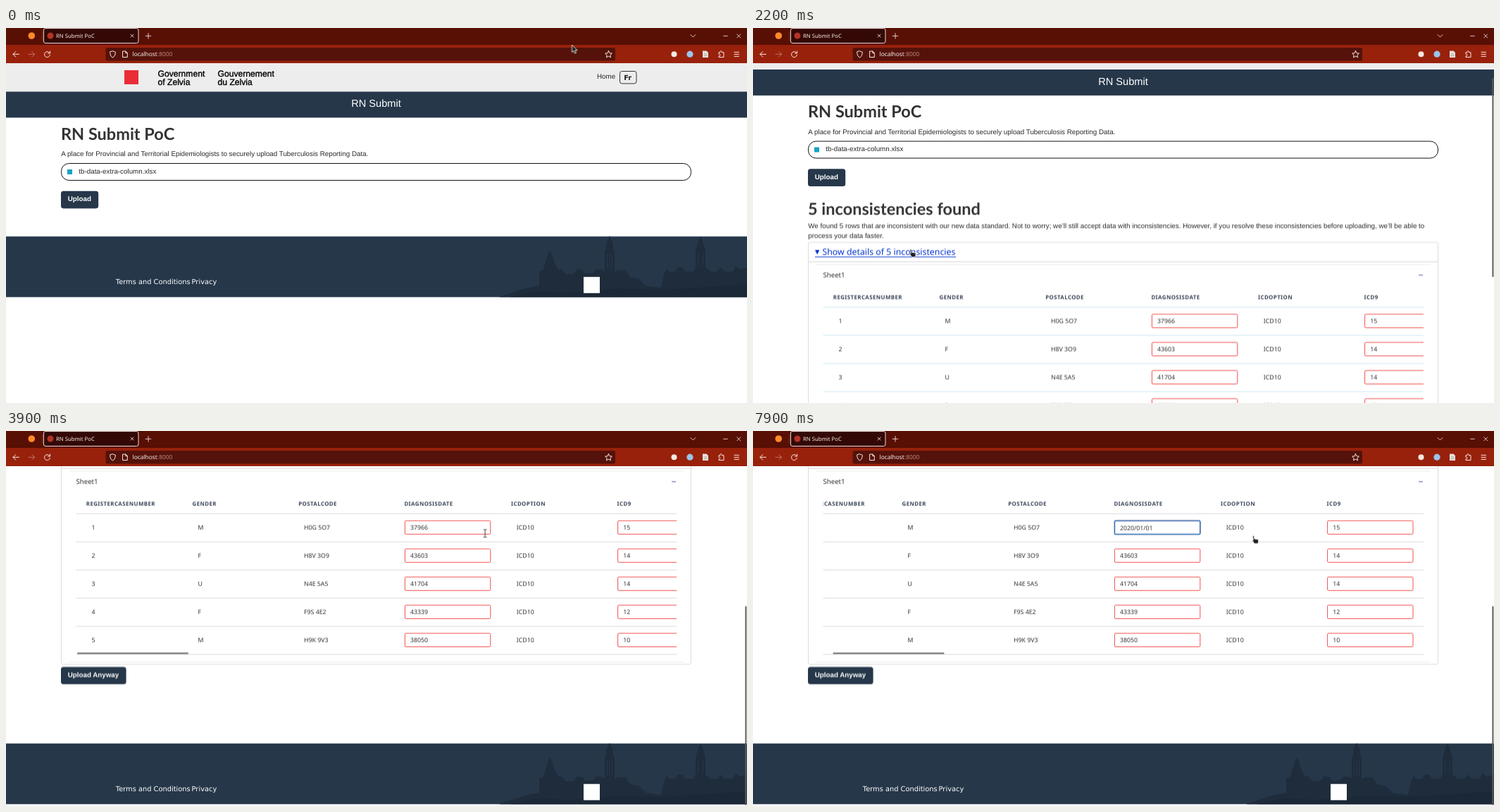
Animation of 1052x533 px, one loop 8 s. Source, as an HTML page:

```html
<!DOCTYPE html>
<html lang="en">
<head>
<meta charset="utf-8">
<title>RN Submit PoC</title>
<style>
@property --scroll { syntax: '<length>'; inherits: true; initial-value: 0px; }
@property --side { syntax: '<length>'; inherits: true; initial-value: 0px; }

html, body { margin: 0; width: 100%; height: 100%; overflow: hidden; background: #fff; }
svg { display: block; width: 100vw; height: 100vh; text-rendering: geometricPrecision; }
text { white-space: pre; }

.body { font: 9.8px 'Liberation Sans', Arial, sans-serif; fill: #2b2b2b; }
.title { font: 14.6px 'Liberation Sans', Arial, sans-serif; fill: #fff; }
.btn { font: bold 9.8px 'Liberation Sans', Arial, sans-serif; fill: #fff; }
.brand { font: 12.15px 'Liberation Sans', Arial, sans-serif; fill: #000; stroke: #000; stroke-width: .35; }
.head { font: bold 23.5px Lato, sans-serif; fill: #333; }
.ui { font-family: 'Noto Sans', sans-serif; fill: #333; }
.cell { font: 8.77px 'Noto Sans', sans-serif; fill: #333; }
.th { font: bold 7.9px 'Noto Sans', sans-serif; letter-spacing: .05em; fill: #3a4658; }
.foot { font: 9.86px 'DejaVu Sans', sans-serif; fill: #fff; }
.navy { fill: #26374a; }
.icon { fill: none; stroke: #f7e8e3; stroke-width: 1; stroke-linecap: round; stroke-linejoin: round; }
.box { fill: #fff; stroke: #dcdcdc; }
.input { fill: #fff; stroke: #f25050; }
.bar { fill: #5c5c5c; }

/* every part shares one 8 s clock */
svg, .t { animation: 8s step-end infinite; }
svg { animation-name: scroll, side; }
.page { transform: translateY(calc(var(--scroll) * -1)); }
.cols { transform: translateX(calc(var(--side) * -1)); }
.thumb-a { transform: translateY(calc(var(--scroll) * .97)); }
.thumb-b { transform: translateY(calc(var(--scroll) * .637)); }
.thumb-h { transform: translateX(calc(var(--side) * .236)); }

@keyframes scroll {
  0% { --scroll: 0px; }
  11.25% { --scroll: .6px; }
  18.75% { --scroll: .6px; animation-timing-function: steps(3, start); }
  22.5% { --scroll: 31.5px; }
  32.5% { --scroll: 31.5px; animation-timing-function: steps(2, start); }
  35% { --scroll: 83.9px; animation-timing-function: steps(3, start); }
  38.75%, 100% { --scroll: 310.8px; }
}
@keyframes side {
  0% { --side: 0px; }
  93.75% { --side: 0px; animation-timing-function: steps(5, start); }
  100% { --side: 53px; }
}

.results, .opened, .hand, .ibeam, .line, .focus, .sel, .typed, .caret { opacity: 0; }
.results { animation-name: results; }
@keyframes results { 11.25%, 100% { opacity: 1; } }
.opened { animation-name: opened; }
@keyframes opened { 23.75%, 100% { opacity: 1; } }
.closed { animation-name: closed; }
@keyframes closed { 23.75%, 100% { opacity: 0; } }
.anyway { animation-name: anyway; }
@keyframes anyway { 23.75%, 100% { transform: translateY(279.6px); } }
.footer { transform: translateY(296.3px); animation-name: footer; }
@keyframes footer {
  11.25% { transform: translateY(475.6px); }
  23.75%, 100% { transform: translateY(755px); }
}
.upload { animation-name: upload; }
@keyframes upload { 8.75% { fill: #3b4b5e; } 12.5% { fill: #26374a; } }
.sum { fill: #284162; animation-name: sum; }
@keyframes sum { 21.25% { fill: #0535d2; } 37.5% { fill: #284162; } }
.line { animation-name: line; }
@keyframes line { 21.25% { opacity: 1; } 37.5% { opacity: 0; } }
.rules { stroke: #c5e6f3; stroke-width: .85; animation-name: rules; }
@keyframes rules { 37.5%, 100% { stroke: #d2d5d9; } }
.bars { animation-name: bars; }
@keyframes bars {
  63.75% { opacity: 1; animation-timing-function: steps(4, start); }
  68.75% { opacity: 0; }
  92.5%, 100% { opacity: 1; }
}

.focus { animation-name: focus; }
@keyframes focus { 52.5%, 100% { opacity: 1; } }
.sel { animation-name: sel; }
@keyframes sel { 53.75% { opacity: 1; } 62.5% { opacity: 0; } }
.typed { animation-name: typed; }
@keyframes typed { 62.5%, 100% { opacity: 1; } }
.caret { animation-name: caret; }
@keyframes caret { 62.5% { opacity: 1; } 92.5% { opacity: 0; } }
.cover { animation-name: cover; }
@keyframes cover {
  62.5% { transform: translateX(5px); }
  63.75% { transform: translateX(10px); }
  66.25% { transform: translateX(15.05px); }
  67.5% { transform: translateX(20.06px); }
  70% { transform: translateX(23.3px); }
  72.5% { transform: translateX(28.3px); }
  73.75% { transform: translateX(33.4px); }
  77.5% { transform: translateX(36.6px); }
  80% { transform: translateX(41.6px); }
  81.25%, 100% { transform: translateX(46.8px); }
}

.cursor { animation-name: cursor; }
@keyframes cursor {
  0% { transform: translate(803.5px, 24px); }
  1.25% { transform: translate(803.5px, 24px); animation-timing-function: steps(7, start); }
  10% { transform: translate(106px, 242px); }
  12.5% { transform: translate(106px, 242px); animation-timing-function: steps(5, start); }
  18.75% { transform: translate(205px, 246px); animation-timing-function: steps(3, start); }
  22.5% { transform: translate(224.5px, 315px); }
  37.5% { transform: translate(224.5px, 315px); animation-timing-function: steps(2, start); }
  40% { transform: translate(358.5px, 275px); animation-timing-function: steps(3, start); }
  43.75% { transform: translate(553px, 203px); animation-timing-function: steps(4, start); }
  48.75% { transform: translate(701px, 150px); animation-timing-function: steps(3, start); }
  52.5% { transform: translate(638.5px, 136.5px); }
  92.5% { transform: translate(638.5px, 136.5px); animation-timing-function: steps(2, start); }
  95%, 100% { transform: translate(711px, 149.5px); }
}
.arrow { animation-name: arrow; }
@keyframes arrow { 8.75% { opacity: 0; } 12.5% { opacity: 1; } 21.25%, 100% { opacity: 0; } }
.hand { animation-name: hand; }
@keyframes hand {
  8.75% { opacity: 1; } 12.5% { opacity: 0; }
  21.25% { opacity: 1; } 37.5% { opacity: 0; } 93.75%, 100% { opacity: 1; }
}
.ibeam { animation-name: ibeam; }
@keyframes ibeam { 37.5% { opacity: 1; } 93.75% { opacity: 0; } }
</style>
</head>
<body>
<svg viewBox="0 0 1052 533" preserveAspectRatio="none">
  <defs>
    <clipPath id="view"><rect x="99.5" y="60" width="852.5" height="262"/></clipPath>
  </defs>

  <g class="page">
    <rect y="50" width="1052" height="41" fill="#ededed"/>
    <rect x="168" y="60" width="20" height="20" fill="#eb2d37"/>
    <g class="brand">
      <text x="215.5" y="69">Government</text><text x="215.5" y="80.5">of Zelvia</text>
      <text x="300.5" y="69">Gouvernement</text><text x="300.5" y="80.5">du Zelvia</text>
    </g>
    <text class="body" x="839" y="72.4">Home</text>
    <rect x="871.5" y="61.5" width="23.5" height="17.5" rx="3" fill="none" stroke="#333"/>
    <text x="877.3" y="73.6" font-family="'DejaVu Sans', sans-serif" font-weight="bold" font-size="9.8" fill="#222">Fr</text>
    <rect class="navy" y="90.5" width="1052" height="36.9"/>
    <text class="title" x="525.5" y="112" text-anchor="middle">RN Submit</text>

    <text class="head" x="78" y="158.6">RN Submit PoC</text>
    <text class="body" x="78.3" y="182">A place for Provincial and Territorial Epidemiologists to securely upload Tuberculosis Reporting Data.</text>
    <rect x="78.5" y="192.5" width="894" height="24" rx="11" fill="#fff" stroke="#111"/>
    <rect x="87" y="201" width="7" height="7" fill="#16a3c4"/>
    <text class="body" x="103.3" y="206.6">tb-data-extra-column.xlsx</text>
    <rect class="t upload navy" x="78" y="231.7" width="53.2" height="24.7" rx="3.5"/>
    <text class="btn" x="87.7" y="246.1">Upload</text>

    <g class="t results">
      <text class="head" x="78" y="297.3">5 inconsistencies found</text>
      <text class="body" x="78.3" y="315.6">We found 5 rows that are inconsistent with our new data standard. Not to worry; we’ll still accept data with inconsistencies. However, if you resolve these inconsistencies before uploading, we’ll be able to</text>
      <text class="body" x="78.3" y="330.4">process your data faster.</text>
      <rect class="t closed box" x="78.5" y="336.1" width="894" height="27" rx="2"/>
      <g class="t opened">
        <rect class="box" x="78.5" y="336.1" width="894" height="306.2" rx="2"/>
        <path d="M78.5 363.8H972.5" stroke="#d4d4d4"/>
        <path d="M90 367.8H962M90 639H962" stroke="#ececec"/>
        <g transform="translate(0 310.8)">
          <text class="ui" x="99.4" y="75.6" font-size="9.7">Sheet1</text>
          <path d="M945.2 72H951" stroke="#4a4fb0"/>
          <g clip-path="url(#view)">
            <g class="cols">
              <g id="table"></g>
              <g class="t sel">
                <rect x="574" y="131.5" width="25.3" height="12" fill="#3584e4"/>
                <text class="cell" x="574" y="140.7" style="fill:#fff">37966</text>
              </g>
              <g class="t typed">
                <rect x="570" y="129" width="100" height="17" fill="#fff"/>
                <text class="cell" x="574" y="140.7">2020/01/01</text>
                <g class="t cover">
                  <rect x="574" y="129.5" width="60" height="16" fill="#fff"/>
                  <path class="t caret" d="M574.8 131.5V143" stroke="#111" stroke-width=".9"/>
                </g>
              </g>
              <rect class="t focus" x="566.4" y="127.5" width="121.4" height="19.2" rx="1.5" fill="none" stroke="#2670b8" stroke-width="1.5"/>
            </g>
            <path id="rules" class="t rules" fill="none"/>
          </g>
          <g class="t bars"><rect class="bar thumb-h" x="101" y="315" width="158" height="1.8" rx=".9"/></g>
        </g>
      </g>
      <g class="t sum">
        <path class="t closed" d="M89 347L94.5 350.2L89 353.5Z"/>
        <path class="t opened" d="M88 347H94.4L91.2 353.6Z"/>
        <text x="98.4" y="354.4" font-family="'Noto Sans', sans-serif" font-size="12.35">Show details of 5 inconsistencies</text>
        <rect class="t line" x="88" y="356.4" width="200" height="1"/>
      </g>
      <g class="t anyway">
        <rect class="navy" x="78" y="366.4" width="92.6" height="24.7" rx="3.5"/>
        <text class="btn" x="87.7" y="380.9">Upload Anyway</text>
      </g>
    </g>

    <g class="t footer">
      <rect class="navy" width="1052" height="86.2"/>
      <path fill="#1e2c3c" d="M700 86.2L718 80L740 73L757 70V50L762 48L765 40L770 24L772 20L774 24L780 40L784 47L789 47L795 54L806 53L810 47L818 47L822 53L834 52L838 47L846 47L850 50V20L852 18V10L856 1L857 -1L858 1L862 10V18L864 20V50L870 48L880 48L886 58L898 60L908 70L930 73L934 54L938 46L942 50H950L954 44L960 44L964 50H976L979 44V20L984 4L986 0L988 4L993 20V44L1000 50H1010L1014 44L1020 50H1032L1036 42L1042 47L1052 44V86.2Z"/>
      <path fill="#1a2635" d="M715 86.2L750 78L800 80L870 74L930 76L1052 68V86.2Z" opacity=".6"/>
      <path stroke="#2b3c50" d="M853.5 24V46M857 24V46M860.5 24V46M982.5 24V42M989.5 24V42" fill="none" opacity=".7"/>
      <text class="foot" x="155.8" y="67.4">Terms and Conditions</text>
      <text class="foot" x="263.6" y="67.4">Privacy</text>
      <rect x="820" y="57.5" width="23" height="23" fill="#fff"/>
    </g>
  </g>

  <g class="t results">
    <g class="t bars">
      <g class="t closed"><rect class="bar thumb-a" x="1049.4" y="51.5" width="2" height="449.5" rx="1"/></g>
      <g class="t opened"><rect class="bar thumb-b" x="1049.4" y="51" width="2" height="283" rx="1"/></g>
    </g>
  </g>

  <rect width="1052" height="24.5" fill="#580f04"/>
  <rect y="24" width="1052" height="26" fill="#98210b"/>
  <circle cx="36.3" cy="11" r="4.8" fill="#ff8a2a"/>
  <path d="M51.5 5V18" stroke="#7d3a2f" stroke-width=".8"/>
  <rect x="53.5" y=".5" width="134.5" height="21" rx="2.5" fill="#340905" stroke="#e9d8d3"/>
  <circle cx="63" cy="11" r="4.5" fill="#b23327"/>
  <text class="ui" x="71" y="13.9" font-size="7.75" style="fill:#f8ebe7">RN Submit PoC</text>
  <rect x="141.5" y="28" width="723.5" height="18.5" rx="2.5" fill="#54120a"/>
  <text class="ui" x="179.5" y="40.2" font-size="8.4" style="fill:#fbf1ee">localhost<tspan fill="#b9857a">:8000</tspan></text>
  <g class="icon">
    <path d="M177.2 9L181.2 13M181.2 9L177.2 13M202 7.5V15.1M198.2 11.3H205.8M972 9.5L975.5 13L979 9.5M1018.7 11.3H1024.3M1037.8 8.8L1042.8 13.8M1042.8 8.8L1037.8 13.8" stroke-width=".85"/>
    <path d="M18.5 37.3H10M13.8 33.5L10 37.3L13.8 41.1"/>
    <path d="M32 37.3H40.5M36.7 33.5L40.5 37.3L36.7 41.1" opacity=".4"/>
    <path d="M62 35.5A4 4 0 1 0 62.5 38.3M62.6 33V36H59.6"/>
    <path d="M151.5 32.8L155.3 34.2C155.3 38.5 154 40.5 151.5 42C149 40.5 147.7 38.5 147.7 34.2Z"/>
    <path d="M166 33H169.8L172.3 35.5V41.5H166ZM169.8 33V35.5H172.3"/>
    <path d="M855.5 32.5L857 35.7L860.4 36.1L857.9 38.4L858.5 41.8L855.5 40.1L852.5 41.8L853.1 38.4L850.6 36.1L854 35.7Z"/>
    <path d="M1012 36V34.7H1014C1013.3 31.8 1017 31.8 1016.3 34.7H1019V41.5H1012V39.7C1014.8 40.3 1014.8 36.5 1012 37Z"/>
    <path d="M1034 34.3H1040.5M1034 37.3H1040.5M1034 40.3H1040.5"/>
  </g>
  <circle cx="948.5" cy="37.2" r="4" fill="#f7e8e3"/>
  <circle cx="971" cy="37.2" r="4.6" fill="#9cc4ea"/>
  <path d="M989 32.5H994.5L997 35V42H989Z" fill="#e6e1df"/>
  <path d="M990.5 37H995.5M990.5 39.5H995.5" stroke="#9a9290" stroke-width=".8"/>

  <g class="t cursor">
    <path class="t arrow" d="M0 0V10.5L2.5 8.3L4.1 12.2L6 11.4L4.4 7.7H7.6Z" fill="#222" stroke="#fff" stroke-width=".8"/>
    <path class="t hand" d="M-1.5 .5C-1.5 -.7 .4 -.7 .5 .5L.8 3.8L5 4.6C6.4 4.9 6.8 5.7 6.6 7L6 10.5H.8L-1.8 6.5C-2.3 5.5 -1.3 4.8 -.6 5.6Z" fill="#222" stroke="#fff" stroke-width=".7"/>
    <path class="t ibeam" d="M-2.3 -5.5H-.7L0 -5L.7 -5.5H2.3M0 -5V5M-2.3 5.5H-.7L0 5L.7 5.5H2.3" fill="none" stroke="#3a3a3a"/>
  </g>
</svg>

<script>
const cols = [113.8, 264.6, 415.2, 565.4, 717, 867.6];
const heads = ['RegisterCaseNumber', 'Gender', 'PostalCode', 'DiagnosisDate', 'ICDOption', 'ICD9'];
const rows = [
  ['1', 'M', 'H0G 5O7', '37966', 'ICD10', '15'],
  ['2', 'F', 'H8V 3O9', '43603', 'ICD10', '14'],
  ['3', 'U', 'N4E 5A5', '41704', 'ICD10', '14'],
  ['4', 'F', 'F9S 4E2', '43339', 'ICD10', '12'],
  ['5', 'M', 'H9K 9V3', '38050', 'ICD10', '10']
];
const rowTop = i => 117.5 + 40 * i;
const label = (cls, x, y, s) => `<text class="${cls}" x="${x}" y="${y}">${s}</text>`;
const field = (x, y) => `<rect class="input" x="${x}" y="${y}" width="121.4" height="19.2" rx="1.5"/>`;

const cell = (s, c, top) => {
  const editable = c === 3 || c === 5;
  const x = cols[c] + (editable ? 8.6 : 7.8);
  return (editable ? field(cols[c] + 1, top + 10) : '') + label('cell', x, top + 23.2, s);
};

document.getElementById('table').innerHTML =
  heads.map((h, c) => label('th', cols[c], 106.1, h.toUpperCase())).join('') +
  rows.map((r, i) => r.map((s, c) => cell(s, c, rowTop(i))).join('')).join('');

document.getElementById('rules').setAttribute('d',
  Array.from({ length: 6 }, (_, i) => `M99.5 ${rowTop(i)}H952`).join(''));
</script>
</body>
</html>
```
